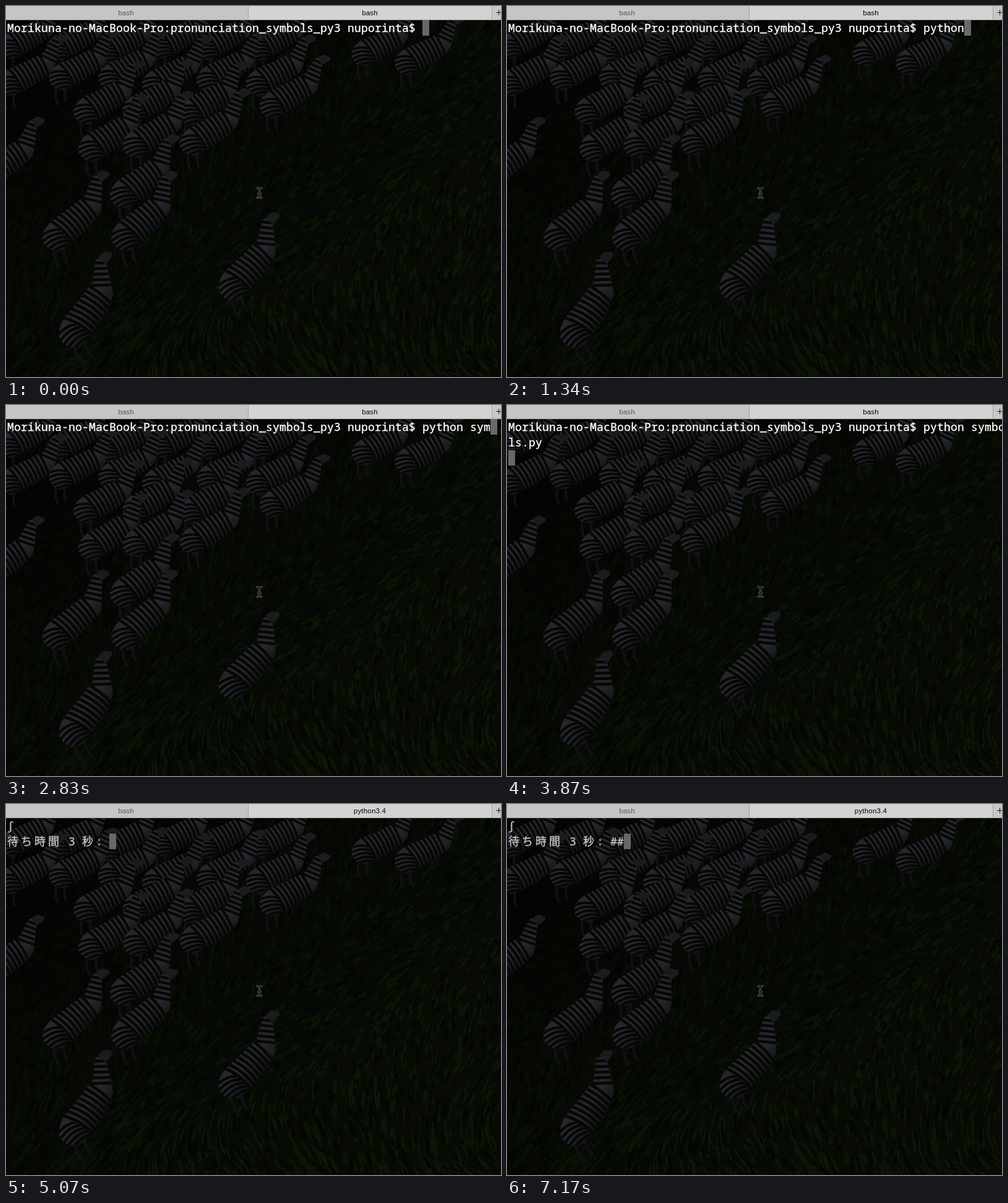
An HTML page that plays this animation: 800x600 px, repeating every 8 s.

```html
<!DOCTYPE html>
<html lang="en">
<head>
<meta charset="utf-8">
<title>Terminal</title>
<style>
html, body { margin: 0; width: 100%; height: 100%; overflow: hidden; background: #050704; }
svg { display: block; width: 800px; height: 600px; }
text { white-space: pre; }
.term { font: 18px "Noto Sans Mono", "Noto Sans CJK JP", "Noto Sans CJK", monospace; stroke-width: .35px; }
.tab { font: 11.5px "Liberation Sans", Arial, sans-serif; letter-spacing: .2px; text-anchor: middle; }
</style>
</head>
<body>
<svg viewBox="0 0 800 600">
  <defs>
    <linearGradient id="shade" x2=".7" y2=".7">
      <stop offset=".2" stop-color="#020302" stop-opacity=".75"/>
      <stop offset="1" stop-color="#020302" stop-opacity="0"/>
    </linearGradient>
    <linearGradient id="coat" x2="0" y2="1">
      <stop offset=".1" stop-color="#232427"/>
      <stop offset=".5" stop-color="#27282c"/>
      <stop offset="1" stop-color="#0d0e0f"/>
    </linearGradient>
    <clipPath id="hide"><path d="M-5 4C-8-20 15-30 40-26C65-22 80-24 96-20L128-38L146-35L153-24L149-19L134-20C122-6 112 10 100 20C70 30 40 28 18 26C4 26-4 16-5 4Z"/></clipPath>
    <g id="zebra">
      <path d="M2 14Q-12 26-12 46M16 22Q4 36 3 50" fill="none" stroke="#0f1011" stroke-width="5"/>
      <g clip-path="url(#hide)">
        <rect x="-15" y="-45" width="175" height="80" fill="url(#coat)"/>
        <path id="stripes" fill="none" stroke="#060707" stroke-width="4.800"/>
        <path d="M136-40L156-34L154-18L132-18Z" fill="#1a1b1e"/>
      </g>
    </g>
    <path id="beam" d="M406 294.500Q409.500 294.500 409.500 298V306Q409.500 310 406 310M413 294.500Q409.500 294.500 409.500 298M409.500 306Q409.500 310 413 310M407.500 303.500H411.500"/>
  </defs>

  <rect width="800" height="600" fill="#070b04"/>
  <g id="grass" fill="none"></g>
  <rect width="800" height="600" fill="url(#shade)"/>
  <g id="herd"></g>

  <g fill="none" stroke-linecap="round">
    <use href="#beam" stroke="#6d706b" stroke-width="3"/>
    <use href="#beam" stroke="#080a08" stroke-width="1.300"/>
  </g>

  <rect id="cursor" width="11" height="25" fill="#686868"/>
  <g id="rows" class="term"></g>

  <rect width="800" height="23" fill="#d3d3d3"/>
  <rect width="391" height="22" fill="#c4c6c4"/>
  <rect x="786" width="14" height="22" fill="#c7c9c7"/>
  <path d="M391.500 0V22M785.500 0V22" stroke="#a2a2a2"/>
  <path d="M0 22.500H800" stroke="#8d8e8d"/>
  <path d="M792 10.500H800M796.500 6V15" stroke="#161616"/>
  <text class="tab" x="194" y="15" fill="#555">bash</text>
  <text class="tab" id="title" x="588" y="15" fill="#000"></text>
</svg>
<script>
const $ = id => document.getElementById(id);
const add = (parent, tag, attrs) => {
  const el = document.createElementNS("http://www.w3.org/2000/svg", tag);
  for (const k in attrs) el.setAttribute(k, attrs[k]);
  return parent.appendChild(el);
};
let seed = 17;
const rnd = (a, b) => {
  seed = (seed * 1664525 + 1013904223) % 4294967296;
  return a + (b - a) * seed / 4294967296;
};

// Grass: blades lean along a slow wave and lie flatter near the bottom
function blades(color, width, count) {
  let d = "";
  for (let i = 0; i < count; i++) {
    const x = rnd(-10, 800), y = rnd(30, 620);
    const low = Math.max(0, (y - 440) / 160);
    const len = rnd(8, 18) * (1 + low);
    const lean = 1 + .4 * Math.sin(x / 90 + y / 60) + low * x / 500;
    const dx = Math.cos(lean) * len, dy = -Math.sin(lean) * len;
    d += `M${x.toFixed(1)} ${y.toFixed(1)}q${(dx * .2).toFixed(1)} ${(dy * .6).toFixed(1)} ${dx.toFixed(1)} ${dy.toFixed(1)}`;
  }
  add($("grass"), "path", { d, stroke: color, "stroke-width": width });
}
blades("#0c1505", 5, 900);
blades("#040603", 5, 800);
blades("#0f1708", 2, 1100);
blades("#050704", 2, 1100);

// Stripes: haunch, barrel, neck
let stripes = "";
for (let i = 0; i < 6; i++) stripes += `M-12 ${9 * i - 19}Q16 ${9 * i - 22} 31 ${9 * i - 4}`;
for (let i = 0; i < 8; i++) stripes += `M${26 + 9 * i}-34Q${38 + 8 * i} 0 ${30 + 8 * i} 32`;
for (let i = 0; i < 6; i++) stripes += `M${88 + 8 * i} ${-28 - 4 * i}l26 40`;
$("stripes").setAttribute("d", stripes);

// Nearer animals are larger and climb more steeply
function zebra(x, y) {
  const angle = -28 - y * y / 9000;
  const size = .82 + y / 2200;
  add($("herd"), "use", {
    href: "#zebra",
    transform: `translate(${x} ${y}) rotate(${angle}) scale(${size} ${size * .9}) translate(-50 0)`
  });
}
// The packed herd stands in rows; the others walk at its edge
for (let row = 0; row < 4; row++) {
  const inset = row >> 1;
  for (let x = 30 + 130 * inset; x < 440 - 110 * inset; x += 80) {
    zebra(x + rnd(-7, 7), 58 + 50 * row + rnd(-7, 7));
  }
}
const strays = [[602, 64], [672, 78], [455, 146], [-5, 255], [214, 286], [105, 352], [216, 352], [388, 428], [128, 500]];
strays.forEach(p => zebra(...p));

// Terminal
const LOOP = 8000, COLS = 73, CELL = 11, ROW = 25, LEFT = 2, TOP = 23;
const COMPLETE = 3120, ENTER = 3870, RUN = 4020, WAIT = 5070, STEP = 1050;
const prompt = "Morikuna-no-MacBook-Pro:pronunciation_symbols_py3 nuporinta$ ";
const command = "python symbols.py ";
const keyTimes = [900, 1050, 1050, 1190, 1340, 1340, 1490, 1790, 2080, 2830];

function screenAt(t) {
  if (t >= WAIT) return "ʃ\n待ち時間 3 秒: " + "#".repeat(Math.floor((t - WAIT) / STEP));
  if (t >= RUN) return "Exit: q, Next: hit any key.";
  if (t >= ENTER) return prompt + command + "\n";
  if (t >= COMPLETE) return prompt + command;
  return prompt + command.slice(0, keyTimes.filter(at => at <= t).length);
}
const cells = ch => ch > "\u2fff" ? 2 : 1;
const wrap = s => s.length > COLS ? [s.slice(0, COLS), s.slice(COLS)] : [s];
const rows = [0, 1, 2].map(i => add($("rows"), "text", { y: TOP + 19 + i * ROW }));
let shown = null;

function draw(t) {
  const screen = screenAt(t);
  if (screen === shown) return;
  shown = screen;
  const lines = screen.split("\n").flatMap(wrap);
  rows.forEach((row, i) => {
    const xs = [];
    let x = LEFT;
    for (const ch of lines[i] || "") {
      xs.push(x);
      x += cells(ch) * CELL;
    }
    row.setAttribute("x", xs.join(" "));
    row.textContent = lines[i] || "";
    if (i === lines.length - 1) $("cursor").setAttribute("x", x);
  });
  $("cursor").setAttribute("y", TOP + (lines.length - 1) * ROW);
  const ink = t < RUN ? "#fff" : "#c3c4c3";
  $("rows").setAttribute("fill", ink);
  $("rows").setAttribute("stroke", ink);
  $("title").textContent = t < RUN ? "bash" : "python3.4";
}

const start = performance.now();
function tick() {
  draw((performance.now() - start) % LOOP);
  requestAnimationFrame(tick);
}
tick();
</script>
</body>
</html>
```
